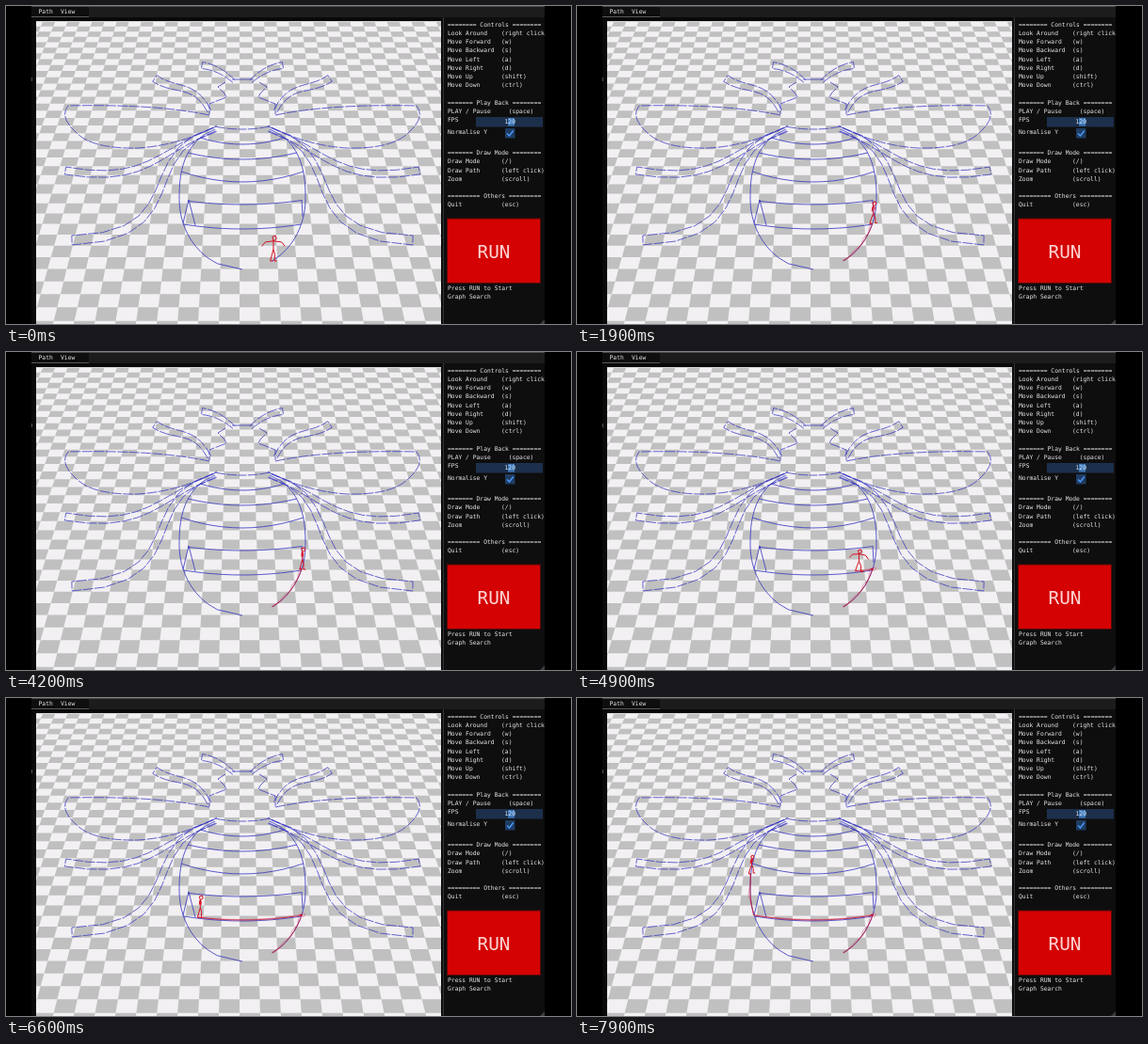
These frames come from a looping animation (600 px wide and 338 px high, 8000 ms). An HTML page with a canvas:

```html
<!DOCTYPE html>
<html lang="en">
<head>
<meta charset="utf-8">
<title>Graph search viewer</title>
<style>
html, body { margin: 0; width: 100%; height: 100%; overflow: hidden; background: #000; }
canvas { display: block; }
</style>
</head>
<body>
<canvas id="stage" width="600" height="338"></canvas>
<script>
const LOOP = 8000;
const ctx = document.getElementById('stage').getContext('2d');
const MONO = '"DejaVu Sans Mono", "Liberation Mono", monospace';
const RED = '#d80c20';

const mix = (a, b, u) => a + (b - a) * u;
const progress = (t, from, to) => Math.min(1, Math.max(0, (t - from) / (to - from)));
const sample = (n, f) => Array.from({ length: n + 1 }, (_, i) => f(i / n));

function rect(x, y, w, h, color) {
  ctx.fillStyle = color;
  ctx.fillRect(x, y, w, h);
}

function label(text, x, y, size = 6.35, color = '#e8e8e8') {
  ctx.font = `${size}px ${MONO}`;
  ctx.fillStyle = color;
  ctx.textBaseline = 'middle';
  ctx.fillText(text, x, y);
}

function polyline(points, color, width = 1) {
  ctx.beginPath();
  points.forEach(([x, y]) => ctx.lineTo(x, y));
  ctx.strokeStyle = color;
  ctx.lineWidth = width;
  ctx.stroke();
}

function clipped(x, y, w, h, paint) {
  ctx.save();
  ctx.beginPath();
  ctx.rect(x, y, w, h);
  ctx.clip();
  paint();
  ctx.restore();
}

// Floor tiles in one-point perspective
const HORIZON = -451, CENTER = 248;
const rowY = n => HORIZON + (338 - HORIZON) / (0.985 + n * 0.019);
const colX = (n, y) => CENTER + n * 0.0279 * (y - HORIZON);

function drawFloor() {
  rect(32, 16, 430, 322, '#f2f0f2');
  ctx.fillStyle = '#c0c0c0';
  ctx.beginPath();
  for (let r = 0; r < 44; r++) {
    const near = rowY(r), far = rowY(r + 1);
    for (let c = -20 + r % 2; c < 20; c += 2) {
      ctx.moveTo(colX(c, near), near);
      ctx.lineTo(colX(c + 1, near), near);
      ctx.lineTo(colX(c + 1, far), far);
      ctx.lineTo(colX(c, far), far);
    }
  }
  ctx.fill();
}

// The abdomen is a rounded oval, fuller at the top
const AXIS = 251;
function halfWidth(y) {
  const [d, e] = y < 205 ? [(205 - y) / 78, 2.5] : [(y - 205) / 75, 2];
  return 67 * Math.max(0, 1 - d ** e) ** (1 / e);
}
const side = (dir, from, to) => sample(24, u => {
  const y = mix(from, to, u);
  return [AXIS + dir * halfWidth(y), y];
});

// A band sags by a parabola between the two sides
const bandY = (x, y, sag) => y + sag * (1 - ((x - AXIS) / halfWidth(y)) ** 2);
const band = (y, sag, from = -1, to = 1) => sample(12, u => {
  const x = AXIS + halfWidth(y) * mix(from, to, u);
  return [x, bandY(x, y, sag)];
});

// Outline of a limb around a cubic spine, tapering from tip to root
function limbOutline(width, ...spine) {
  const at = (u, axis) => {
    const [a, b, c, d] = spine.map(p => p[axis]), v = 1 - u;
    return a * v ** 3 + 3 * b * v * v * u + 3 * c * v * u * u + d * u ** 3;
  };
  const edge = sign => sample(10, u => {
    const dx = at(u + 0.01, 0) - at(u - 0.01, 0), dy = at(u + 0.01, 1) - at(u - 0.01, 1);
    const k = sign * width * (1 - 0.5 * u) / 2 / Math.hypot(dx, dy);
    return [at(u, 0) - dy * k, at(u, 1) + dx * k];
  });
  return [...edge(1).reverse(), ...edge(-1)];
}

const limbs = [
  limbOutline(7, [208, 63], [222, 65], [232, 71], [242, 80]),
  limbOutline(8, [158, 77], [180, 92], [200, 80], [216, 112]),
  limbOutline(8, [63, 175], [150, 190], [160, 155], [222, 131]),
  limbOutline(10, [70, 249], [200, 245], [135, 155], [223, 131])
];
const wingAndHead = new Path2D(
  'M216 116Q160 104 66 106Q56 118 75 135Q92 152 140 151Q185 148 224 127' +
  'M251 78H238M233 81L225 86L232 93L234 97L216 104V115M222 128Q236 131 251 131');

const BLUE = '#3434c0';
function drawHalf() {
  limbs.forEach(points => polyline(points, BLUE, 0.75));
  ctx.stroke(wingAndHead);
}

function drawBee() {
  ctx.save();
  ctx.setLineDash([11, 1.5]);
  drawHalf();
  ctx.translate(2 * AXIS, 0);
  ctx.scale(-1, 1);
  drawHalf();
  ctx.restore();
  const bands = [[140, 7], [156, 7], [176, 11], [206, 5, -0.86, 0.94], [232, 5]];
  const outline = [
    side(-1, 131, 280), side(1, 131, 271),
    ...bands.map(b => band(...b)),
    [[188, 231], [194, 206], [201, 233]], [[314, 206], [315, 224]]
  ];
  outline.forEach(points => polyline(points, BLUE, 0.8));
}

// Walk: up the right side, pause, along the lowest band, up the left side
function feetAt(t) {
  if (t < 4600) {
    const y = mix(271, 231, progress(t, 0, 1900));
    return [AXIS + halfWidth(y), y];
  }
  if (t < 6900) {
    const x = mix(315, 189, progress(t, 4600, 6900));
    return [x, bandY(x, 231, 5)];
  }
  const y = mix(231, 182, progress(t, 6900, LOOP));
  return [AXIS - halfWidth(y), y];
}

function drawTrail(t) {
  const points = [];
  for (let s = 0; s < t; s += 100) points.push(feetAt(s));
  points.push(feetAt(t));
  polyline(points, '#c81838', 0.8);
  polyline(points.map(([x, y], i) => [x - 1 + Math.sin(i), y - 0.6]), 'rgba(200,20,60,.5)', 0.7);
  if (t > 4600) {
    ctx.beginPath();
    ctx.arc(315.5, 230.5, 1.8, 0, 7);
    ctx.stroke();
  }
}

function drawFigure(t) {
  const [x, y] = feetAt(t);
  const size = (y + 30) / 270;
  const beat = 2 * Math.PI * t / 1200;
  const reach = 6 + 5 * Math.cos(beat);
  const stride = 2 + 4 * Math.sin(beat) ** 2;
  const at = (dx, dy) => [x + dx * size, y + dy * size];
  const neck = at(1, -19), hip = at(1, -11);
  polyline([neck, at(0, -23), at(3, -24), at(4, -21), neck, hip], RED);
  for (const dir of [-1, 1]) {
    const sway = dir * Math.sin(beat);
    polyline([neck, at(1 + dir * reach * 0.7, -18 + sway), at(1 + dir * reach, -14 + 2 * sway)], RED);
    polyline([hip, at(1 + dir * stride * 0.7, -6), at(dir * stride, sway), at(dir * stride + 2.5, sway)], RED);
  }
}

const header = title => {
  const left = Math.floor((24 - title.length) / 2);
  return `${'='.repeat(left)} ${title} ${'='.repeat(24 - title.length - left)}`;
};

// Each section: y of its first line, then "name|key" lines
const sections = [
  [20, header('Controls'), 'Look Around|(right click)', 'Move Forward|(w)', 'Move Backward|(s)',
    'Move Left|(a)', 'Move Right|(d)', 'Move Up|(shift)', 'Move Down|(ctrl)'],
  [103, header('Play Back'), 'PLAY / Pause|  (space)', 'FPS'],
  [134, 'Normalise Y'],
  [156.5, header('Draw Mode'), 'Draw Mode|(/)', 'Draw Path|(left click)', 'Zoom|(scroll)'],
  [202, header('Others'), 'Quit|(esc)'],
  [300, 'Press RUN to Start', 'Graph Search']
];

function drawPanel() {
  rect(462, 12, 110, 326, '#0e0e0f');
  rect(464, 12, 1, 326, '#36363a');
  rect(499, 118, 71, 10.5, '#1c304c');
  rect(533, 119, 7, 8.5, '#3f78b8');
  rect(530, 130, 10.5, 10.5, '#1f3c62');
  polyline([[532, 135.5], [534.5, 138], [538.8, 132.5]], '#4a9cff', 1.4);
  rect(468, 225.5, 100, 69.5, '#5a0808');
  rect(469, 226.5, 98, 67.5, '#d40202');
  for (const [top, ...lines] of sections) {
    lines.forEach((line, i) => {
      const [name, key = ''] = line.split('|');
      label(name, 469, top + i * 9.25);
      label(key, 526, top + i * 9.25);
    });
  }
  label('120', 529.5, 123.5, 6.35, '#dcecff');
  label('RUN', 500.5, 262.8, 19.4, '#ffd4d4');
  ctx.fillStyle = '#3c3c40';
  ctx.fill(new Path2D('M572 333V338H567Z'));
}

function drawMenu() {
  rect(27, 0, 545, 12, '#1c1c1d');
  rect(27, 1, 61, 10, '#0e0e0f');
  rect(27, 0, 545, 1, '#4a4a4c');
  rect(27, 11, 61, 1, '#5a5a5c');
  label('Path', 34.5, 6.3);
  label('View', 58, 6.3);
  rect(27, 76, 1, 4, '#55555a');
}

function draw(t) {
  rect(0, 0, 600, 338, '#000');
  clipped(27, 0, 545, 338, () => {
    rect(27, 0, 545, 338, '#09090a');
    drawMenu();
    clipped(32, 16, 430, 322, () => {
      drawFloor();
      drawBee();
      drawTrail(t);
      drawFigure(t);
    });
    drawPanel();
  });
}

const start = performance.now();
function tick() {
  draw((performance.now() - start) % LOOP);
  requestAnimationFrame(tick);
}
tick();
</script>
</body>
</html>
```
